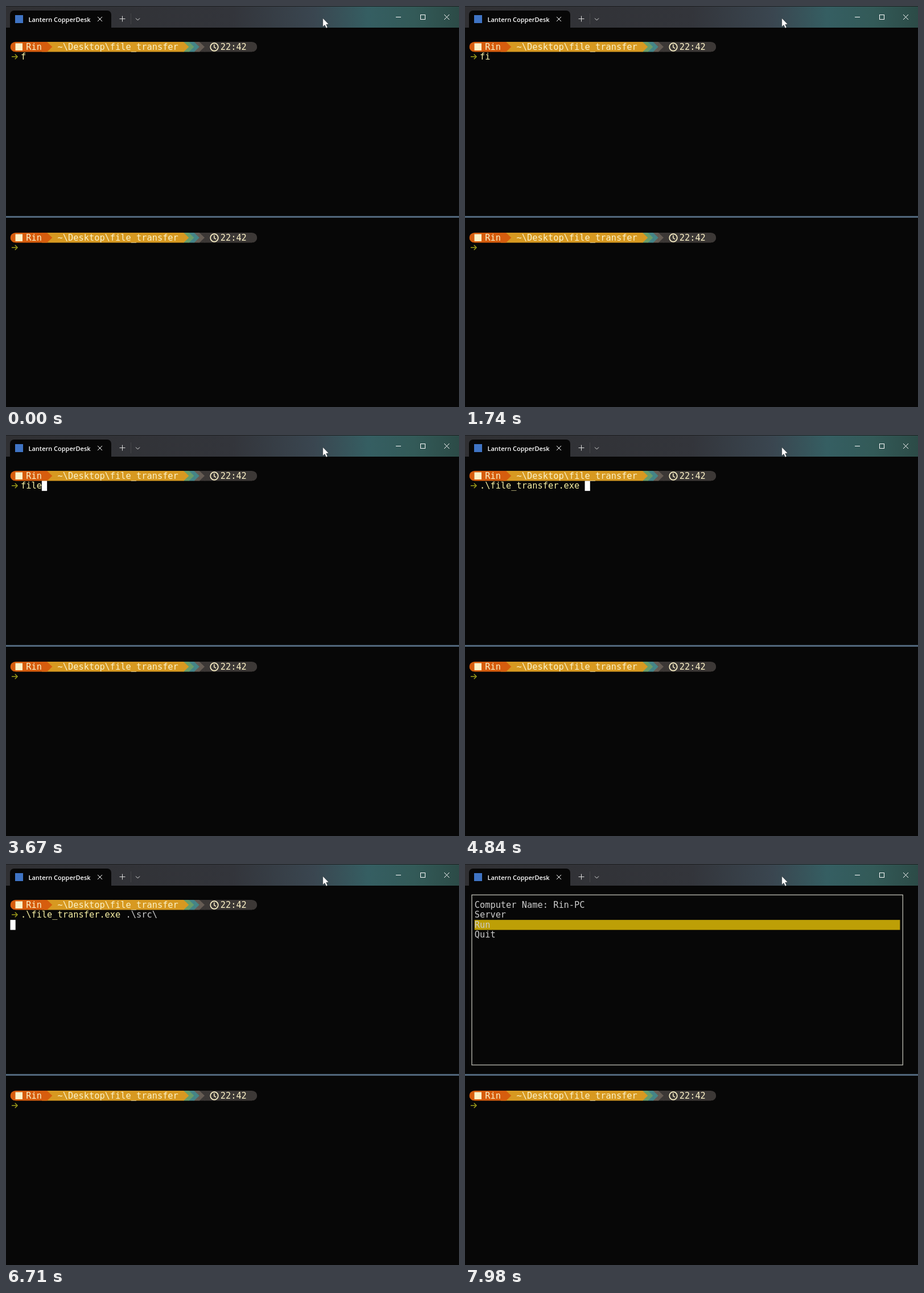
Write an HTML page with a canvas that moves like this. It is 796 by 704 pixels and loops after 8 s.

```html
<!DOCTYPE html>
<html lang="en">
<head>
<meta charset="utf-8">
<title>Terminal</title>
<style>
html, body { margin: 0; width: 796px; height: 704px; overflow: hidden; background: #070707; }
canvas { display: block; }
</style>
</head>
<body>
<canvas id="stage" width="796" height="704"></canvas>
<script>
const ctx = document.getElementById('stage').getContext('2d');
const LOOP = 8000;
const CELL = 9.23, ROW = 17.58, LEFT = 7.5, TOP = 45.4, PANE = 335;
const MONO = '15.33px "DejaVu Sans Mono", monospace';
const BG = '#070707', CREAM = '#fbf1c7', GREY = '#cccccc', YELLOW = '#f9f1a5';
const USER = 'Rin', TITLE = 'Lantern CopperDesk';
const EXE = '.\\file_transfer.exe';

// [time, command, argument]
const typed = [
  [0, 'f', ''], [710, 'fi', ''], [1770, 'fil', ''], [2640, 'file', ''],
  [3840, EXE, ''], [4840, EXE, ' '], [5200, EXE, ' s'], [5480, EXE, ' sr'],
  [5910, EXE, ' src'], [6110, EXE, ' .\\src\\']
];
// [time, cursor shown]
const blink = [
  [0, 0], [40, 1], [440, 0], [710, 1], [955, 0], [1470, 1], [1740, 0], [1770, 1],
  [1970, 0], [2640, 1], [3010, 0], [3510, 1], [4040, 0], [4540, 1], [5060, 0],
  [5200, 1], [5570, 0], [5910, 1], [6080, 0], [6110, 1], [6610, 0], [6640, 1]
];
const ENTER = 6640, MENU = 6940;
const picked = [[0, 0], [7680, 1], [7980, 2]];

const at = (list, t) => list.filter(e => e[0] <= t).pop();
const colX = c => LEFT + c * CELL;
const rowY = r => TOP + r * ROW;

function rect(x, y, w, h, color) {
  ctx.fillStyle = color;
  ctx.fillRect(x, y, w, h);
}

function poly(points, color) {
  ctx.fillStyle = color;
  ctx.beginPath();
  points.forEach(([x, y]) => ctx.lineTo(x, y));
  ctx.closePath();
  ctx.fill();
}

function line(points, color, width = 1) {
  ctx.strokeStyle = color;
  ctx.lineWidth = width;
  ctx.beginPath();
  points.forEach(([x, y], i) => i ? ctx.lineTo(x, y) : ctx.moveTo(x, y));
  ctx.stroke();
}

function text(str, col, row, color) {
  ctx.font = MONO;
  ctx.fillStyle = color;
  ctx.fillText(str, colX(col), rowY(row) + 13.7);
}

function titleBar() {
  const g = ctx.createLinearGradient(0, 0, 796, 0);
  [[0, '#303033'], [0.5, '#33353b'], [0.68, '#3a4650'], [0.8, '#355e62'],
   [0.9, '#335a58'], [1, '#2c4b47']].forEach(s => g.addColorStop(...s));
  rect(0, 0, 796, 38, g);
  rect(0, 0, 796, 1, '#1c1e20');

  ctx.fillStyle = BG;
  ctx.beginPath();
  ctx.roundRect(7, 8, 178, 30, [7, 7, 0, 0]);
  ctx.fill();
  rect(16, 16, 14, 14, '#3f74c4');
  ctx.font = '600 11px "Open Sans", "Noto Sans", sans-serif';
  ctx.fillStyle = '#fff';
  ctx.fillText(TITLE, 39.5, 27.5);

  const cross = (x, y, r) => {
    line([[x - r, y - r], [x + r, y + r]], '#fff');
    line([[x - r, y + r], [x + r, y - r]], '#fff');
  };
  cross(165, 23, 4);
  line([[199.5, 22.5], [209.5, 22.5]], '#ddd');
  line([[204.5, 17.5], [204.5, 27.5]], '#ddd');
  line([[219.5, 13], [219.5, 32]], '#454548');
  line([[228, 21.5], [231.5, 25], [235, 21.5]], '#ddd');
  line([[685, 19.5], [694, 19.5]], '#fff');
  ctx.strokeRect(728.5, 15.5, 8, 8);
  cross(774.5, 19.5, 4.5);
}

function pointer(x, y) {
  const p = [[0, 0], [0, 15], [3.3, 11.8], [5.8, 17.2], [8.2, 16.2], [5.8, 10.8], [10.2, 10.4]]
    .map(([a, b]) => [x + a, y + b]);
  poly(p, '#fff');
  line([...p, p[0]], 'rgba(0,0,0,.6)', 0.6);
}

// Coloured bar with round ends and arrow joints
function prompt() {
  const y = rowY(1), mid = y + ROW / 2, r = ROW / 2;
  const cap = (x, dir, color) => {
    ctx.fillStyle = color;
    ctx.beginPath();
    ctx.ellipse(x, mid, CELL, r, 0, 0, 7);
    ctx.save();
    ctx.clip();
    ctx.fillRect(dir < 0 ? x - CELL : x - 1, y, CELL + 1, ROW);
    ctx.restore();
  };
  const parts = [[37, 46, '#3c3836'], [36, 36, '#665c54'], [35, 35, '#458588'],
                 [34, 34, '#689d6a'], [7, 33, '#d79921'], [1, 7, '#d65d0e']];
  cap(colX(46), 1, '#3c3836');
  cap(colX(1), -1, '#d65d0e');
  parts.forEach(([from, to, color], i) => {
    const a = i && i < 5 ? from - 1 : from;
    rect(colX(a), y, colX(to) - colX(a), ROW, color);
    if (!i) rect(colX(36), y, CELL + 1, ROW, color);
    else poly([[colX(to) - 0.5, y], [colX(to), y], [colX(to + 1), mid],
               [colX(to), y + ROW], [colX(to) - 0.5, y + ROW]], color);
  });

  rect(16.5, 65.5, 12.5, 12.5, CREAM);
  text(USER, 3, 1, CREAM);
  text('~\\Desktop\\file_transfer', 9, 1, CREAM);
  ctx.strokeStyle = CREAM;
  ctx.lineWidth = 1.7;
  ctx.beginPath();
  ctx.arc(366, 72, 6.8, 0, 7);
  ctx.stroke();
  line([[365.8, 67.5], [365.8, 72.3], [369, 74.3]], CREAM, 1.5);
  text('22:42', 40, 1, CREAM);

  line([[10, 89], [20, 89]], '#98971a', 1.6);
  line([[15.8, 84.8], [20, 89], [15.8, 93.2]], '#98971a', 1.6);
}

function shell(t) {
  const [, cmd, arg] = at(typed, t);
  prompt();
  text(cmd, 2, 2, YELLOW);
  text(arg, 2 + cmd.length, 2, GREY);
  if (!at(blink, t)[1]) return;
  const entered = t >= ENTER;
  const col = entered ? 0 : 2 + cmd.length + arg.length;
  rect(colX(col), rowY(entered ? 3 : 2), CELL, ROW, '#fff');
}

function menu(t) {
  ctx.strokeStyle = '#bdbdb4';
  ctx.lineWidth = 1.3;
  ctx.strokeRect(12, 54.3, 757.3, 298.5);
  const row = 1 + at(picked, t)[1];
  rect(colX(1), rowY(row), 81 * CELL, ROW, '#bd9f06');
  ['Computer Name: ' + USER + '-PC', 'Server', 'Run', 'Quit']
    .forEach((s, i) => text(s, 1, i + 1, GREY));
}

function draw(now) {
  const t = now % LOOP;
  rect(0, 0, 796, 704, BG);
  titleBar();
  pointer(556.8, 21.5);
  if (t < MENU) shell(t);
  else menu(t);
  rect(0, 368.5, 796, 3.5, '#34414f');
  rect(0, 369.3, 796, 1.7, '#5f7890');
  ctx.save();
  ctx.translate(0, PANE);
  prompt();
  ctx.restore();
}

const start = performance.now();
function tick() {
  draw(performance.now() - start);
  requestAnimationFrame(tick);
}
tick();
</script>
</body>
</html>
```
